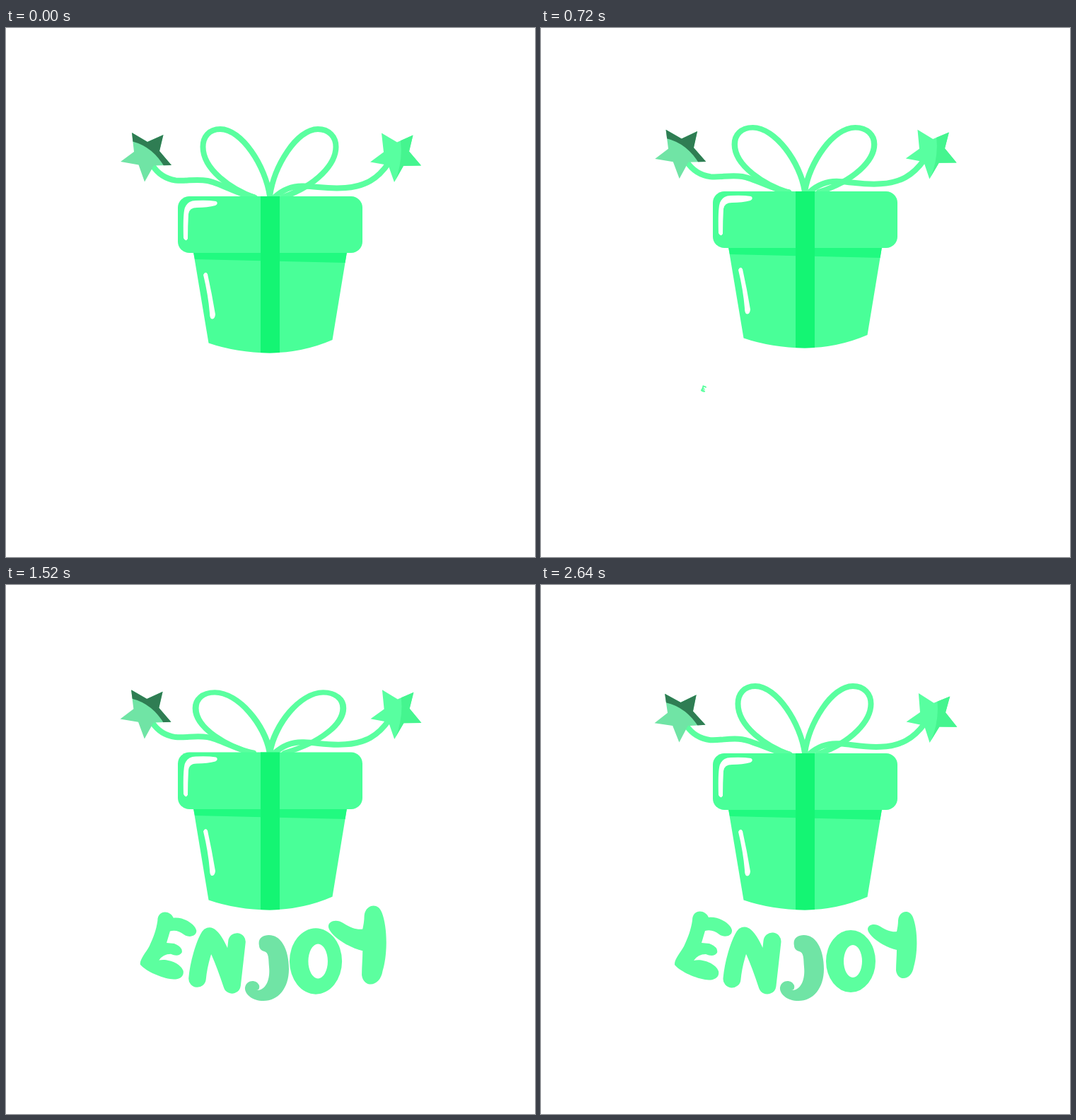
Recreate the animation shown at these times as an HTML page. Size 748 by 748 pixels, loop 2.68 s.

```html
<!DOCTYPE html>
<html lang="en">
<head>
<meta charset="utf-8">
<title>Enjoy</title>
<style>
  html, body { margin: 0; width: 100%; height: 100%; overflow: hidden; background: #fff; }
  svg { display: block; width: 100vw; height: 100vh; }
  .line { fill: none; stroke: #5aff9f; stroke-width: 8; stroke-linecap: round; stroke-linejoin: round; }
  .box { fill: #49ff98; }
  .shade { fill: #21fa80; }
  .band { fill: #14f573; }
  .shine { fill: #fff; }
  .letter { fill: #5cff9f; }
  .letter .stroke { fill: none; stroke: #5cff9f; stroke-width: 25; stroke-linecap: round; stroke-linejoin: round; }
  .letter.soft { fill: #70e4a5; }
</style>
</head>
<body>
<svg viewBox="0 0 748 748" role="img" aria-label="Enjoy">
  <defs>
    <path id="star" d="M178 148 200 161 222.500 151 217 174 234 194 209 194.500 196 217.500 187.500 193.500 162 189 181 175Z"/>
    <clipPath id="starClip"><use href="#star"/></clipPath>
  </defs>

  <g id="top">
    <g id="tailL">
      <path class="line" d="M350 239C330 236 302 219 285 216C268 213 255 217 240 215.500C224 213 214 205 207 194"/>
      <use href="#star" fill="#70e4a5"/>
      <path clip-path="url(#starClip)" fill="#2f7d53" d="M150 130H250V205L225 198Q208 168 179 160.500L150 155Z"/>
    </g>
    <g id="tailR">
      <path class="line" d="M380 239C392 228 407 223 421 223.500C441 224 455 228 480 226C508 224 526 213 541 191"/>
      <g transform="translate(353 .5)">
        <use href="#star" fill="#58ffa0"/>
        <path clip-path="url(#starClip)" fill="#45f58f" d="M201 140Q213 180 195 222H250V140Z"/>
      </g>
    </g>
    <path id="loopL" class="line" d="M373 238C367 195 333 143 303 143C287 143 278.500 154 278.500 168C278.500 200 318 228 352 240"/>
    <path id="loopR" class="line" d="M373 238C379 195 411 143 441 143C457 143 466.500 154 466.500 168C466.500 192 440 222 392 239"/>
  </g>

  <g id="gift">
    <path class="box" d="M265 317H482L461.500 441Q420 459 373 459.500Q326 459 286.500 445.500Z"/>
    <path class="shade" d="M265 317H482L479.500 332L267 327Z"/>
    <rect class="box" x="243" y="238" width="261" height="80" rx="16"/>
    <path class="band" d="M360 238H387V459L373 459.500L360 459Z"/>
    <path class="shine" d="M251 297Q250 262 253 254Q257 244 268 244Q285 243 297 245Q301 248 296 251Q285 254 270 254Q259 254 258 263Q257 280 257 298Q254 303 251 297Z"/>
    <path class="shine" d="M279 349Q282 343 285 348Q291 375 296 405Q295 413 290 411Q288 409 288 403Q286 378 279 349Z"/>
  </g>

  <g class="letter" data-at="230 510">
    <path d="M214 474C214 458 232 458 237 470C250 468 268 478 270 488C271 497 258 499 252 494C246 489 239 487 232 489L227 506L238 507Q251 512 249 520Q244 527 233 522Q222 522 216 531C228 528 247 535 251 546C253 556 243 560 232 558C215 555 195 545 189 537C188 530 197 520 202 511C208 498 212 488 214 474Z"/>
  </g>
  <g class="letter" data-at="298 531">
    <path class="stroke" d="M270 557C272 535 280 508 287.500 496C296 500 308 530 320 566L327 504"/>
  </g>
  <g class="letter soft" data-at="369 541">
    <path d="M358 510C355 497 368 493 378 496C392 500 400 520 400 543C400 570 385 588 364 588C348 588 337 578 338 569C340 558 354 557 358 566C359 571 357 573 354 573C366 574 374 560 372 540C371 528 372 520 365 518C361 517 358 514 358 510Z"/>
  </g>
  <g class="letter" data-at="438 532">
    <path fill-rule="evenodd" d="M403 532a35 44 0 1 1 70 0a35 44 0 1 1 -70 0ZM428 532a13 23 0 1 0 26 0a13 23 0 1 0 -26 0Z"/>
  </g>
  <g class="letter" data-at="496 509">
    <path d="M505 474C506 461 521 457 526 470C533 488 533 520 527 540C524 560 504 561 502 545C502 535 503 525 503 516C490 513 471 503 464 492C457 482 470 476 480 483C489 489 497 491 503 490C504 485 505 480 505 474Z"/>
  </g>
</svg>

<script>
const LOOP = 2680, STEP = 40, FLOOR = 459, LID = 238, MID = 373;
const $ = id => document.getElementById(id);
const put = (el, value) => el.setAttribute("transform", value);

// Smooth curve through [time, value] keys, flat at the extremes.
function track(...keys) {
  const slope = keys.map(([t, v], i) => {
    const a = keys[i - 1], b = keys[i + 1];
    if (!a || !b || (v - a[1]) * (b[1] - v) <= 0) return 0;
    return (b[1] - a[1]) / (b[0] - a[0]);
  });
  return t => {
    if (t <= keys[0][0]) return keys[0][1];
    const i = keys.findIndex(k => k[0] > t) - 1;
    if (i < 0) return keys[keys.length - 1][1];
    const [t0, v0] = keys[i], [t1, v1] = keys[i + 1];
    const d = t1 - t0, s = (t - t0) / d, r = 1 - s;
    return v0 * (1 + 2 * s) * r * r + v1 * s * s * (3 - 2 * s)
      + d * s * r * (slope[i] * r - slope[i + 1] * s);
  };
}

const jump = track([0, 0], [200, -48], [400, -97], [520, -75], [560, -60], [640, -28], [780, 0]);
const squash = track([780, 1], [900, .945], [960, .955], [1220, 1.03], [1520, 1.007], [1640, 1]);
const sway = track([0, 0], [200, 3], [370, 3.8], [520, 3.4], [900, -.5], [960, -.4], [1240, 3.7],
  [1520, .6], [1660, 0], [2090, 3.7], [2120, 3.5], [2400, 0], [2640, 1.9]);
const bounce = (landing, late) => track([400, 0], [520, -.025], [720, -.05], [960, landing],
  [1220, .16], [1520, -.11], [1760, .22], [2120, late], [2320, .08], [2600, 0]);
const bounceL = bounce(-.03, -.037), bounceR = bounce(.01, -.006);
const pop = track([0, 0], [20, .1], [100, .92], [180, 1.14], [260, 1.25], [350, 1.3],
  [500, 1.18], [580, 1.06], [660, 1], [800, .98], [1000, 1]);

const letters = [...document.querySelectorAll(".letter")];

const scaleAt = (x, y, sx, sy) =>
  `translate(${x} ${y}) scale(${sx} ${sy}) translate(${-x} ${-y})`;

function draw(t) {
  const y = jump(t), s = squash(t), a = sway(t);
  const l = bounceL(t), r = bounceR(t);
  put($("gift"), `translate(0 ${y}) ${scaleAt(0, FLOOR, 1, s)}`);
  put($("top"), `translate(0 ${y + (FLOOR - LID) * (1 - s)})`);
  put($("tailL"), `rotate(${-a} 350 ${LID})`);
  put($("tailR"), `rotate(${a} 396 ${LID})`);
  put($("loopL"), scaleAt(MID, LID, 1 - l, 1 + l));
  put($("loopR"), scaleAt(MID, LID, 1 - r, 1 + r));
  letters.forEach((el, i) => {
    const k = pop(t - 700 - i * 80);
    const [x, cy] = el.dataset.at.split(" ");
    el.style.display = k > 0 ? "" : "none";
    put(el, scaleAt(x, cy, k, k));
  });
}

const start = performance.now();
function tick(now) {
  const t = Math.max(0, now - start) % LOOP;
  draw(Math.floor(t / STEP) * STEP);
  requestAnimationFrame(tick);
}
draw(0);
requestAnimationFrame(tick);
</script>
</body>
</html>
```
